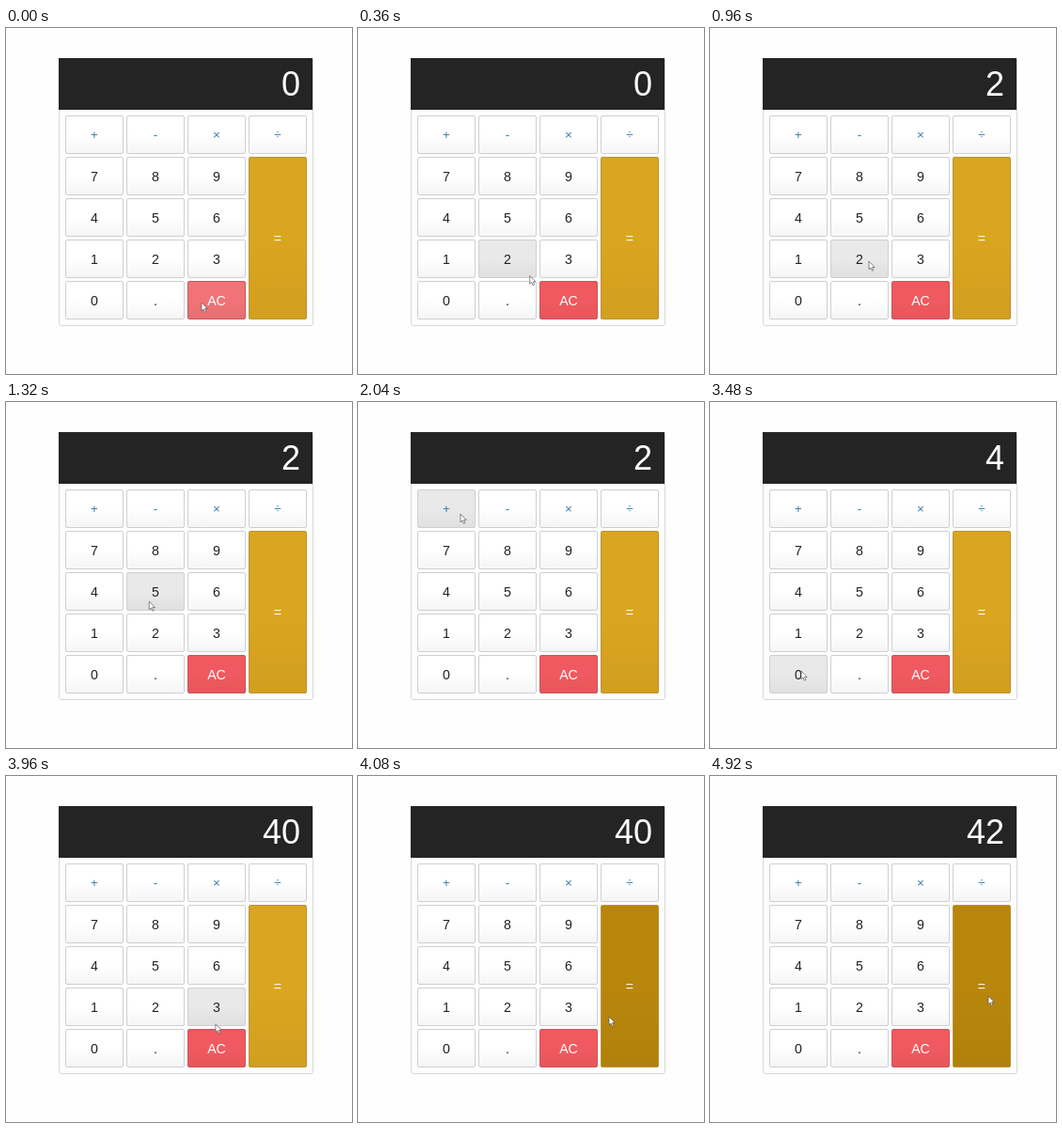
These frames come from a looping animation (368 by 368 pixels, 5400 ms). An HTML page:

```html
<!DOCTYPE html>
<html lang="en">
<head>
<meta charset="utf-8">
<title>Calculator</title>
<style>
  * { box-sizing: border-box; }
  html, body { margin: 0; width: 100%; height: 100%; overflow: hidden; background: #fefefe; }
  body { position: relative; font-family: "Liberation Sans", Arial, sans-serif; cursor: default; }
  #panel, #screen, .key, #pointer { position: absolute; }
  #panel { left: 56px; top: 32px; width: 271px; height: 285px; border: 1px solid #d8d8d8; border-radius: 3px; }
  #screen {
    left: 56px; top: 32px; width: 270px; height: 55px; padding-right: 13px;
    background: #242424; color: #fff; font-size: 36px; line-height: 56px; text-align: right;
  }
  .key {
    width: 62px; height: 41px; display: flex; align-items: center; justify-content: center;
    border: 1px solid #cfcfcf; border-radius: 2px; font-size: 14.2px; color: #222;
    background: #fff linear-gradient(transparent 50%, rgba(0, 0, 0, .04));
  }
  .key.hover { background-color: #e9e9e9; }
  .operator { color: #337cac; font-size: 13.5px; }
  .clear { background-color: #f0595f; border-color: #c8545a; color: #fff; }
  .clear.hover { background-color: #f17377; }
  .equals { height: 173px; background-color: #daa520; border-color: #b99235; color: #fff; }
  .equals.hover { background-color: #b8860b; }
  #pointer { left: 0; top: 0; overflow: visible; }
</style>
</head>
<body>
<div id="panel"></div>
<div id="screen">0</div>
<svg id="pointer" width="8" height="12">
  <path d="M0 0V8.8L2 7 3.4 10.2 4.9 9.5 3.5 6.5H6.2Z" fill="#fff" stroke="#555" stroke-width=".7"/>
</svg>
<script>
const LOOP = 5400, STEP = 120;
const screen = document.getElementById('screen');
const pointer = document.getElementById('pointer');

// [time, x, y]
const path = [
  [0, 208, 292], [600, 169, 248], [1000, 169, 248], [1920, 109, 119],
  [2300, 109, 119], [2880, 93, 198], [3120, 93, 198], [3480, 97, 286],
  [3720, 97, 286], [4080, 267, 256], [4320, 296, 234], [LOOP, 296, 234]
];
// [time, text]
const readings = [[0, '0'], [720, '2'], [3120, '4'], [3720, '40'], [4440, '42']];

const keys = [];
function addKey(label, column, row, type = '') {
  const el = document.createElement('div');
  el.className = 'key ' + type;
  el.textContent = label;
  const x = Math.round(63 + column * 64.9), y = 93 + row * 44;
  el.style.left = x + 'px';
  el.style.top = y + 'px';
  document.body.insertBefore(el, pointer);
  keys.push({ el, x, y, w: 62, h: type === 'equals' ? 173 : 41 });
}
[...'+-×÷'].forEach((c, i) => addKey(c, i, 0, 'operator'));
[...'7894561230.'].forEach((c, i) => addKey(c, i % 3, 1 + Math.floor(i / 3)));
addKey('AC', 2, 4, 'clear');
addKey('=', 3, 1, 'equals');

function pointerAt(t) {
  const i = path.findIndex(p => p[0] > t);
  const [t0, x0, y0] = path[i - 1], [t1, x1, y1] = path[i];
  const u = (t - t0) / (t1 - t0), e = u * u * (3 - 2 * u);
  return [x0 + (x1 - x0) * e, y0 + (y1 - y0) * e];
}

function draw(now) {
  const t = Math.floor((now % LOOP) / STEP) * STEP;
  const [x, y] = pointerAt(t);
  pointer.style.transform = `translate(${x}px, ${y}px)`;
  for (const k of keys) {
    const over = x >= k.x && x < k.x + k.w && y >= k.y && y < k.y + k.h;
    k.el.classList.toggle('hover', over);
  }
  screen.textContent = readings.filter(r => r[0] <= t).pop()[1];
}

let start;
function tick(now) {
  start ??= now;
  draw(now - start);
  requestAnimationFrame(tick);
}
draw(0);
requestAnimationFrame(tick);
</script>
</body>
</html>
```
